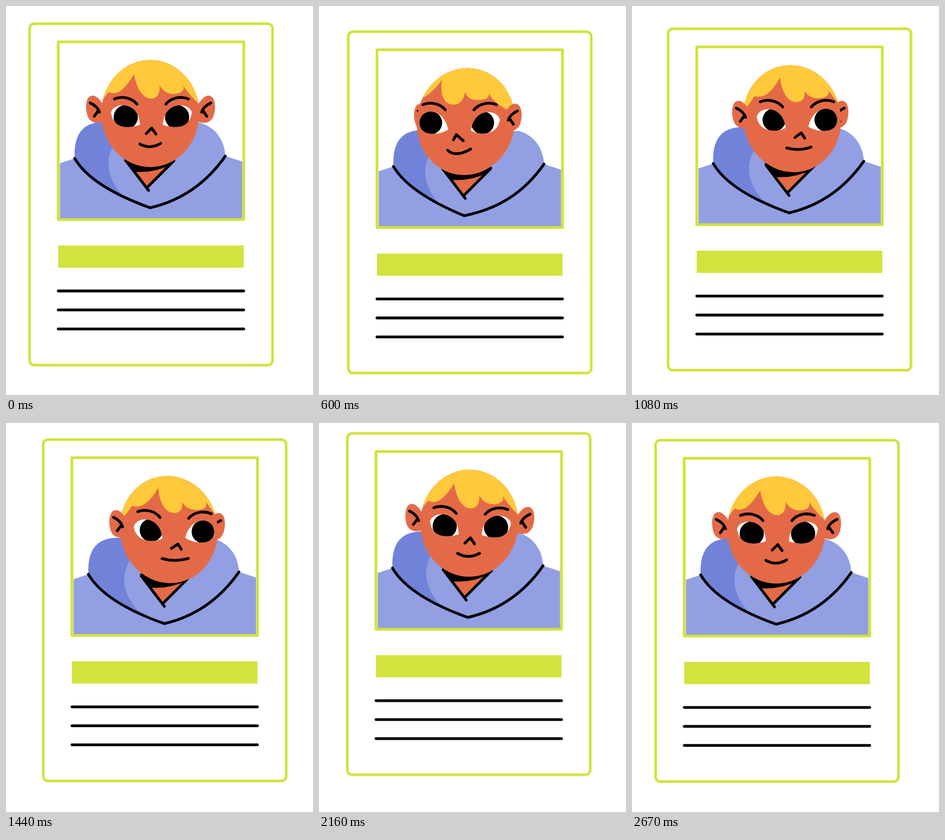
An HTML page with a canvas for the animation above (2.7 s loop, 532 by 674 pixels).

```html
<!DOCTYPE html>
<html>
<head>
<meta charset="utf-8">
<style>
html, body { margin: 0; width: 100%; height: 100%; overflow: hidden; background: #fff; }
canvas { display: block; }
</style>
</head>
<body>
<canvas id="stage" width="532" height="674"></canvas>
<script>
const ctx = document.getElementById('stage').getContext('2d');
const LOOP = 2700;
const LIME = '#d1e33c', SKIN = '#e46a47', HAIR = '#ffc93b', LIGHT = '#929fe2', DARK = '#7083d9', INK = '#000';

// Each shape has three poses: facing front, left and right.
const EYE = [
  'M182 184C187 166 231 164 232 206C219 210 186 218 182 184',
  'M164 188C165 162 205 160 214 200C203 208 165 216 164 188',
  'M194.5 183C199 164 240 162 244.5 202C232 210 199 212 194.5 183'
];
const EYE_SHUT = 'M182 184C194 199 215 203 232.5 203C215 203 194 199 182 184';
const PUPIL_X = [207.5, 183.5, 224.5];
const BROW = [
  'M188 161C200 156 217 158 227 170',
  'M170 157C182 152 199 154 209 166',
  'M200.5 157C212.5 152 229.5 154 239.5 166'
];
const NOSE = [
  'M243 221L252.5 211.5L260 222',
  'M223 218L228 209L240 219.5',
  'M260.5 219L271.5 211L277.5 220'
];
const MOUTH = [
  'M232 239Q250 249 268 238',
  'M213 236Q227 249 253 234',
  'M246.5 237Q266 243 288.5 235.5'
];
const FRINGE = [
  'M160 176Q168 160 178 149Q197 160 222 118C227 148 240 161 252 160.5C262 160 267 152 266 138Q275 152 290 152.5C302 152 310 147 307 138Q317 154 339 174',
  'M152 155Q166 147 166 147Q185 139 203 114C199 146 210 157 223 157C234 157 241 149 243 135Q248 149 265 149C278 149 285 146 285 137Q291 154 326 171',
  'M168 176Q180 164 190.5 147Q213 155 234.5 115C238 140 248 158 264 157.5C275 157 279 149 276.5 138Q286 151 300 151C313 151 321 147 318.5 137Q328 150 342 167'
];
const EAR = 'M172 178C163 160 155 154 148 155.5C137 158 137 180 142 192C147 203 160 206 172 198Z';
const EAR_MARK = 'M146 168Q159 174 162 184M160 181L153 191';

const lerp = (a, b, k) => a + (b - a) * k;

function mix(a, b, k) {
  const target = b.match(/[\d.]+/g);
  let i = 0;
  return a.replace(/[\d.]+/g, n => lerp(+n, +target[i++], k).toFixed(2));
}

const side = u => u < 0 ? 1 : 2;
const pose = (shapes, u) => mix(shapes[0], shapes[side(u)], Math.abs(u));

// Eased value along [time, value] keys.
function track(t, keys) {
  const i = keys.findIndex(k => k[0] > t);
  if (i < 0) return keys[keys.length - 1][1];
  if (i === 0) return keys[0][1];
  const [t0, v0] = keys[i - 1], [t1, v1] = keys[i];
  return lerp(v0, v1, (1 - Math.cos(Math.PI * (t - t0) / (t1 - t0))) / 2);
}

function fill(path, color) {
  ctx.fillStyle = color;
  ctx.fill(new Path2D(path));
}

function stroke(path, color = INK, width = 4.8) {
  ctx.strokeStyle = color;
  ctx.lineWidth = width;
  ctx.stroke(new Path2D(path));
}

function scoped(draw) {
  ctx.save();
  draw();
  ctx.restore();
}

const mirror = axis => ctx.transform(-1, 0, 0, 1, 2 * axis, 0);

function drawBody(u) {
  const tip = 249.5 + (u < 0 ? 8 : 1) * u;
  const front = `M119 264C140 300 190 328 ${tip} 349.5C300 338 345 310 380 260`;
  fill(`${front}L420 273V368H80V277Z`, LIGHT);
  fill('M119 264C117 222 133 203 165 201L250 200V345C190 328 140 300 119 264', DARK);
  const s = 3.5 * u;
  fill(`M${200 + s} 226C${170 + s} 252 ${170 + s} 292 ${200 + s} 326L${tip} 349.5
    C300 338 345 310 380 260C379 235 365 210 335 202Z`, LIGHT);
  scoped(() => {
    ctx.translate(s, 0);
    fill('M207 267L246 315L291 268Z', SKIN);
    fill('M204 263L222 287Q257 290 285 275L294 265Z', INK);
    stroke('M207 267L247 319.5M245 314L291 268');
  });
  stroke(front);
}

function drawEar(isRight, u) {
  const turn = Math.abs(u);
  scoped(() => {
    if (isRight) mirror(250.5);
    ctx.translate(isRight ? 15 * turn - 6 * u : 14.5 * turn - 1.5 * u, 0);
    fill(EAR, SKIN);
    stroke(EAR_MARK);
  });
}

function drawEye(u, blink) {
  stroke(pose(BROW, u));
  const lids = mix(pose(EYE, u), EYE_SHUT, blink);
  scoped(() => {
    ctx.clip(new Path2D(lids));
    ctx.fillStyle = '#fff';
    ctx.fillRect(100, 100, 300, 150);
    ctx.fillStyle = INK;
    ctx.beginPath();
    const turn = Math.abs(u);
    ctx.arc(lerp(PUPIL_X[0], PUPIL_X[side(u)], turn), 192.5 - 4 * turn, 21 - turn, 0, 7);
    ctx.fill();
  });
  if (blink > 0.6) stroke(lids);
}

function drawHead(u, tilt, blink) {
  ctx.translate(250, 275);
  ctx.rotate(tilt * Math.PI / 180);
  ctx.translate(-250, -275);

  if (u <= 0) drawEar(false, u);
  if (u >= 0) drawEar(true, u);

  scoped(() => {
    const skull = new Path2D(), lean = 0.032 * u;
    const outline = new Path2D();
    outline.ellipse(250, 186.3, 85, 92.8, 0, 0, 7);
    skull.addPath(outline, new DOMMatrix([1, 0, lean, 1, 5.5 * u - lean * 186.3, 0]));
    ctx.fillStyle = SKIN;
    ctx.fill(skull);
    ctx.clip(skull);
    fill(pose(FRINGE, u) + 'L400 60L100 60Z', HAIR);
  });

  if (u > 0) drawEar(false, u);
  if (u < 0) drawEar(true, u);

  drawEye(u, blink);
  scoped(() => {
    mirror(252 - 3 * Math.abs(u));
    drawEye(-u, blink);
  });
  stroke(pose(NOSE, u));
  scoped(() => {
    const center = 250 + 17.5 * u, grow = 1 + 0.024 * tilt * tilt;
    ctx.transform(grow, 0, 0, 1, center * (1 - grow), 0);
    stroke(pose(MOUTH, u));
  });
}

function drawCard() {
  ctx.strokeStyle = LIME;
  ctx.lineWidth = 4.5;
  ctx.beginPath();
  ctx.roundRect(40.8, 30.7, 421, 591.5, 8);
  ctx.stroke();
  stroke('M90.5 62H412V370H90.5Z', LIME, 4.8);
  fill('M90.5 415H412V453.5H90.5Z', LIME);
  for (const y of [493.7, 526.6, 559.5]) stroke(`M90.5 ${y}H412`);
}

function render(t) {
  const angle = t / LOOP * 2 * Math.PI;
  const turn = track(t, [[60, 0], [540, -1], [620, -1], [1060, 1], [1440, 1.05], [1880, 0]]);
  const tilt = track(t, [[1080, 0], [1890, 4], [2350, 0]]);
  const blink = track(t, [[2280, 0], [2380, 1], [2480, 1], [2580, 0]]);

  ctx.fillStyle = '#fff';
  ctx.fillRect(0, 0, 532, 674);
  ctx.lineCap = ctx.lineJoin = 'round';
  scoped(() => {
    ctx.translate(12 - 12 * Math.cos(angle), 0.5 + 13.7 * Math.sin(angle - 0.035));
    scoped(() => {
      ctx.beginPath();
      ctx.rect(93.5, 64, 316, 304);
      ctx.clip();
      drawBody(turn);
      drawHead(turn, tilt, blink);
    });
    drawCard();
  });
}

function tick(now) {
  render(now % LOOP);
  requestAnimationFrame(tick);
}
requestAnimationFrame(tick);
</script>
</body>
</html>
```
